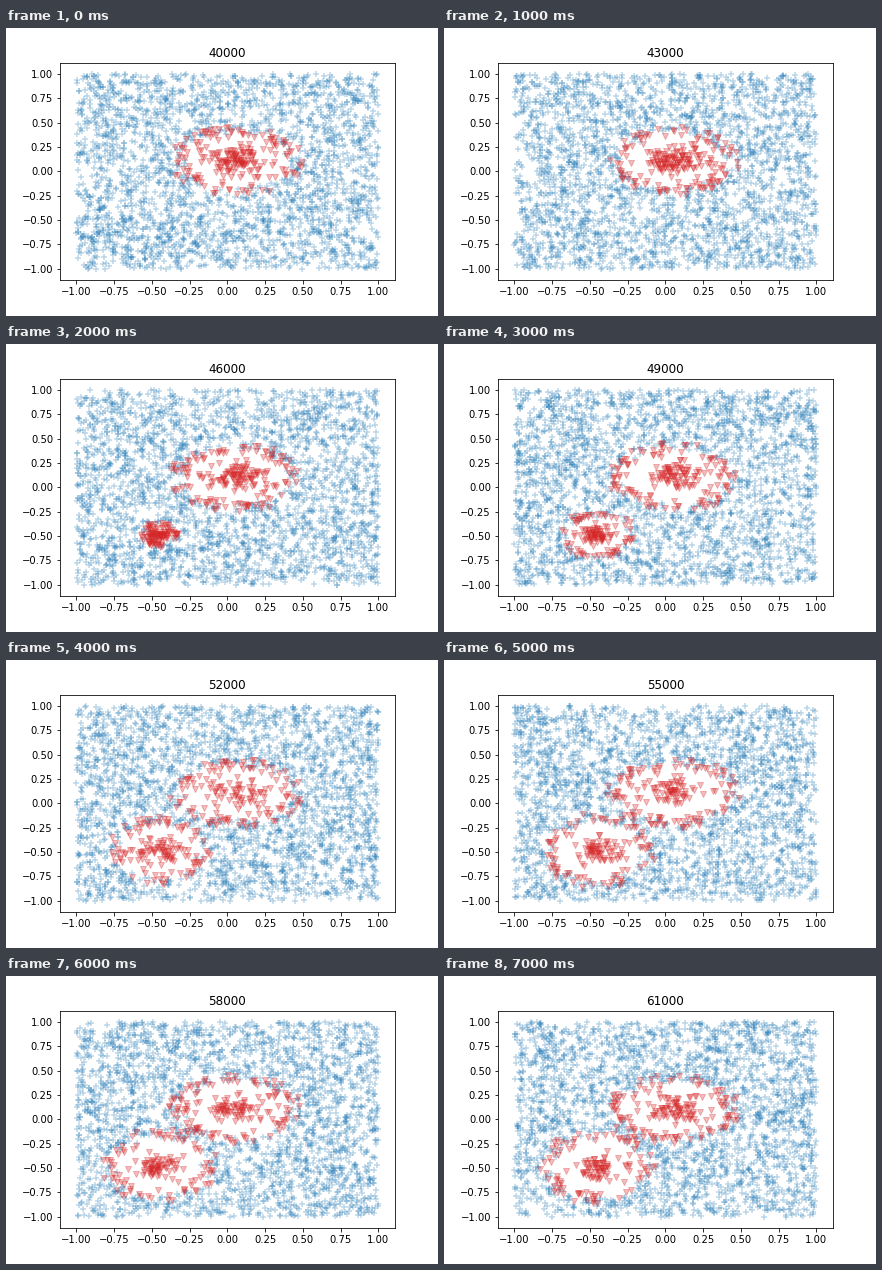
Write a matplotlib script that moves like this. It is 432 px wide and 288 px high and loops after 8 s.

```python
import numpy as np
import matplotlib.pyplot as plt
from matplotlib.animation import FuncAnimation

STEPS = 8
STEP_MS = 1000
N_BLUE = 2900
BIG = (0.055, 0.105, 0.42, 0.335)      # centre x, y and radii
SMALL = (-0.45, -0.485)
GROWTH = (0, 0, 0.12, 0.24, 0.33, 0.365, 0.365, 0.365)
BIG_CORE = (120, 120, 105, 85, 65, 70, 75, 85)

fig, ax = plt.subplots(figsize=(6, 4), dpi=72)
fig.subplots_adjust(left=0.125, right=0.9, bottom=0.125, top=0.88)
ticks = np.linspace(-1, 1, 9)
ax.set(xlim=(-1.109, 1.109), ylim=(-1.115, 1.115), xticks=ticks, yticks=ticks)
title = ax.set_title("")
blue = ax.scatter([], [], marker="+", color="tab:blue", alpha=0.3)
red = ax.scatter([], [], marker="v", color="tab:red", alpha=0.3)


def outside(p, cx, cy, rx, ry, edge):
    """Keep points beyond a slightly ragged share of the ellipse."""
    r = np.hypot((p[:, 0] - cx) / rx, (p[:, 1] - cy) / ry)
    return p[r > edge]


def ring(rng, n, cx, cy, rx, ry):
    a = rng.uniform(0, 2 * np.pi, n)
    r = np.clip(rng.normal(0.89, 0.1, n), 0.65, 1.05)
    return np.c_[cx + rx * r * np.cos(a), cy + ry * r * np.sin(a)]


def core(rng, n, cx, cy, sx, sy):
    z = np.clip(rng.normal(size=(n, 2)), -2.3, 2.3)
    return z * (sx, sy) + (cx, cy)


def draw(i):
    rng = np.random.default_rng(40 + i)
    size = GROWTH[i]
    spots = [ring(rng, 100, *BIG),
             core(rng, BIG_CORE[i], 0.065, 0.11, 0.11, 0.075)]
    field = rng.uniform(-1, 1, (N_BLUE, 2))
    field = outside(field, *BIG, rng.uniform(0.78, 0.98, len(field)))
    if size:
        edge = rng.uniform(0.75, 0.98, len(field))
        field = outside(field, *SMALL, size, size, edge)
        spots.append(ring(rng, int(20 + 160 * size), *SMALL, size, size))
        spread = 0.025 + 0.18 * size
        spots.append(core(rng, 70, *SMALL, spread, spread * 0.75))
    blue.set_offsets(field)
    red.set_offsets(np.vstack(spots))
    title.set_text(str(40000 + 3000 * i))
    return blue, red, title


anim = FuncAnimation(fig, draw, frames=STEPS, interval=STEP_MS,
                     repeat=True, repeat_delay=0, blit=False)
plt.show()
```
